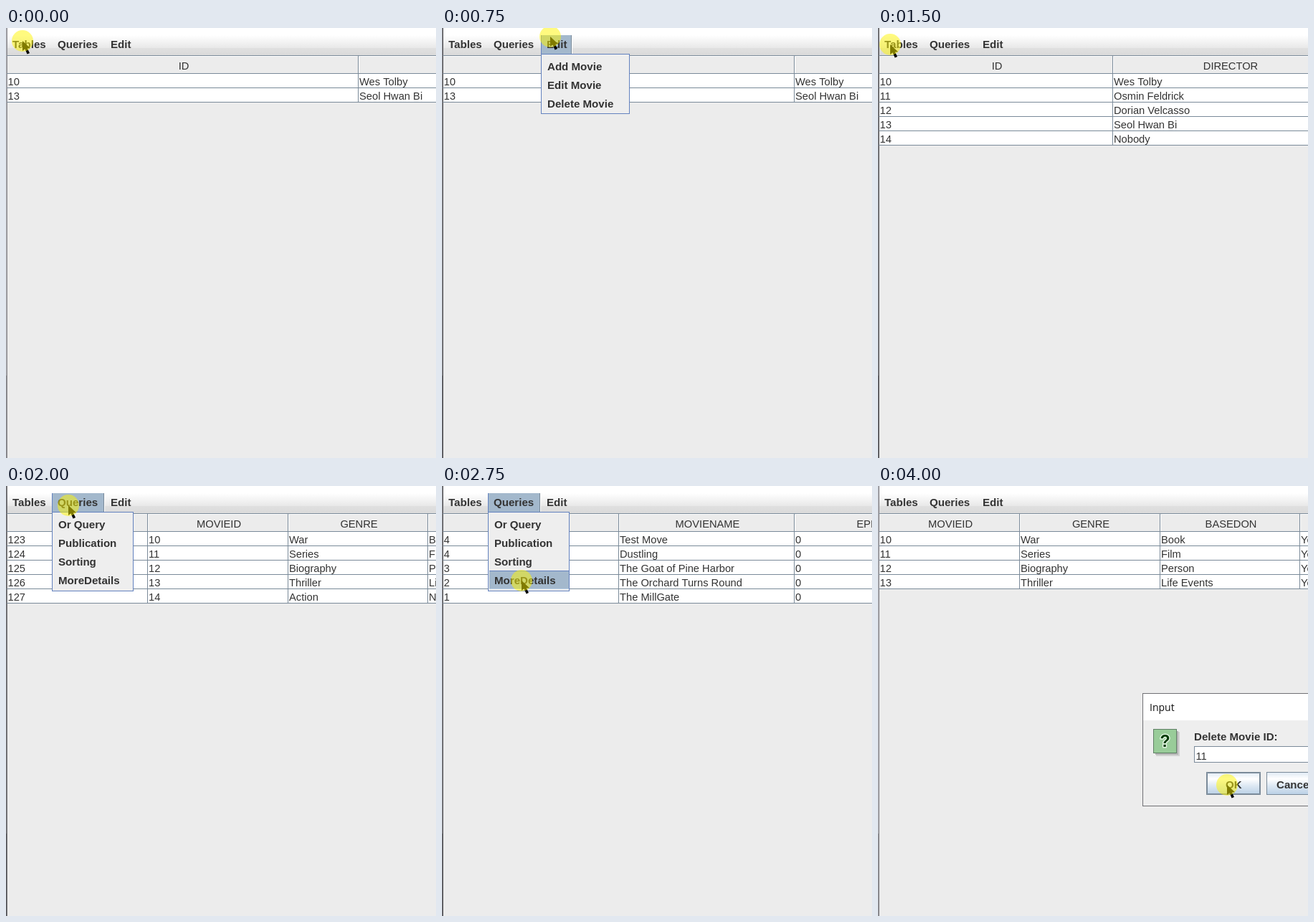
Write an HTML page with a canvas that moves like this. It is 600 px wide and 600 px high and loops after 4250 ms.

```html
<!DOCTYPE html>
<html lang="en">
<head>
<meta charset="utf-8">
<title>Movie tables</title>
<style>
html, body { margin: 0; width: 100%; height: 100%; overflow: hidden; background: #ececec; }
canvas { display: block; width: 600px; height: 600px; }
</style>
</head>
<body>
<canvas id="stage" width="600" height="600"></canvas>
<script>
const ctx = document.getElementById('stage').getContext('2d', { alpha: false });
const SANS = '"Liberation Sans", Arial, sans-serif';
const PLAIN = '14.7px ' + SANS;
const BOLD = 'bold 15.1px ' + SANS;
const LINE = '#7a8a99', BLUE = '#6382bf', PICK = '#a3b8cc', PANEL = '#ececec', INK = '#333';
const STEP = 250, LOOP = 4250;

// Column lines, headers and rows of each view
const found = {
  cols: [1, 491, 981], heads: ['ID', 'DIRECTOR'],
  rows: [['10', 'Wes Tolby'], ['13', 'Seol Hwan Bi']]
};
const directors = {
  cols: [1, 327, 653], heads: ['ID', 'DIRECTOR'],
  rows: [['10', 'Wes Tolby'], ['11', 'Osmin Feldrick'], ['12', 'Dorian Velcasso'],
    ['13', 'Seol Hwan Bi'], ['14', 'Nobody']]
};
const kinds = [['10', 'War', 'Book', 'Yes'], ['11', 'Series', 'Film', 'Yes'],
  ['12', 'Biography', 'Person', 'Yes'], ['13', 'Thriller', 'Life Events', 'Yes']];
const genres = {
  cols: [1, 197, 393, 588, 784], heads: ['ID', 'MOVIEID', 'GENRE', 'BASEDON'],
  rows: [...kinds, ['14', 'Action', 'Nothing']].map((r, i) => [String(123 + i), ...r.slice(0, 3)])
};
const sorted = {
  cols: [1, 246, 491, 737], heads: ['RATING', 'MOVIENAME', 'EPISODES'],
  rows: [['4', 'Test Move', '0'], ['4', 'Dustling', '0'], ['3', 'The Goat of Pine Harbor', '0'],
    ['2', 'The Orchard Turns Round', '0'], ['1', 'The MillGate', '0']]
};
const details = { cols: genres.cols, heads: ['MOVIEID', 'GENRE', 'BASEDON', 'AWARDED'], rows: kinds };

const menus = {
  Tables: { x: 1, end: 64, text: 9, w: 73, items: ['Movie', 'Crew', 'Genre', 'Cast', 'Date'] },
  Queries: { x: 64, end: 137, text: 72, w: 114, items: ['Or Query', 'Publication', 'Sorting', 'MoreDetails'] },
  Edit: { x: 138, end: 181, text: 146, w: 124, items: ['Add Movie', 'Edit Movie', 'Delete Movie'] }
};

// One entry per step: view, pointer, open menu, picked item
const steps = [
  { view: found, at: [23, 18] },
  { view: found, at: [103, 22] },
  { view: found, at: [110, 23], menu: 'Queries' },
  { view: found, at: [151, 12], menu: 'Edit' },
  { view: found, at: [150, 18], bare: true },
  { view: found, at: [40, 80], menu: 'Tables', pick: 1 },
  { view: directors, at: [17, 23] },
  { view: directors, at: [40, 106], menu: 'Tables', pick: 2 },
  { view: genres, at: [87, 27], menu: 'Queries' },
  { view: genres, at: [104, 113], menu: 'Queries', pick: 2 },
  { view: sorted, at: [100, 20] },
  { view: sorted, at: [111, 132], menu: 'Queries', pick: 3 },
  { view: details, at: [150, 18] },
  { view: details, at: [208, 103], menu: 'Edit', pick: 2 },
  { view: details, at: [481, 410], bare: true, entry: '' },
  { view: details, at: [487, 413], bare: true, entry: '' },
  { view: details, at: [487, 417], entry: '11' }
];

function box(x, y, w, h, color) {
  ctx.fillStyle = color;
  ctx.fillRect(x, y, w, h);
}

function frame(x, y, w, h, fill, edge) {
  box(x, y, w, h, edge);
  box(x + 1, y + 1, w - 2, h - 2, fill);
}

function write(text, x, y, font = PLAIN, align = 'left', color = INK) {
  ctx.font = font;
  ctx.textAlign = align;
  ctx.fillStyle = color;
  ctx.fillText(text, x, y);
}

function shade(y, h, ...stops) {
  const g = ctx.createLinearGradient(0, y, 0, y + h);
  stops.forEach(([p, c]) => g.addColorStop(p, c));
  return g;
}

function drawWindow(active) {
  box(0, 0, 600, 600, PANEL);
  box(0, 0, 600, 10, '#fff');
  box(0, 10, 600, 18, shade(10, 18, [0, '#fff'], [1, '#e8e8e8']));
  box(0, 28, 600, 10, shade(28, 10, [0, '#e0e0e0'], [1, '#dadada']));
  box(0, 0, 1, 600, active ? '#6c6c70' : '#aaaaae');
  box(0, 485, 1, 115, active ? '#505056' : '#85858a');
  box(1, 0, 1, 600, active ? '#77777b' : '#8c8c92');
}

function drawTable({ cols, heads, rows }) {
  const bottom = 64 + rows.length * 20;
  box(1, 38, 599, 1, LINE);
  box(2, 39, 598, 1, '#fff');
  box(2, 64, 598, bottom - 64, '#fff');
  box(1, 63, 599, 1, LINE);
  rows.forEach((row, r) => {
    box(1, 83 + r * 20, 599, 1, LINE);
    row.forEach((cell, c) => write(cell, cols[c] + (c ? 2 : 1.5), 80 + r * 20));
  });
  heads.forEach((head, c) => {
    write(head, (cols[c] + cols[c + 1]) / 2 + 2, 58, PLAIN, 'center');
    if (c) {
      box(cols[c], 39, 1, bottom - 39, LINE);
      box(cols[c] + 1, 39, 1, 24, '#fff');
    }
  });
}

function drawMenus(open, pick) {
  for (const name in menus) {
    const m = menus[name];
    if (name === open) {
      box(m.x, 10, m.end - m.x, 27, PICK);
      box(m.x, 10, 1, 27, BLUE);
      box(m.end - 1, 10, 1, 26, LINE);
      box(m.end, 11, 1, 25, '#fff');
    }
    write(name, m.text, 28, BOLD);
  }
  if (!open) return;
  const { x, w, items } = menus[open];
  const top = i => Math.round(39.5 + i * 26.3);
  frame(x, 36, w, Math.round(5 + items.length * 26.4), '#eee', BLUE);
  items.forEach((item, i) => {
    if (i === pick) {
      box(x + 2, top(i), w - 3, 26, PICK);
      box(x + 2, top(i), w - 3, 1, BLUE);
      box(x + 2, top(i) + 25, w - 3, 1, '#b8cfe5');
    }
    write(item, x + 9, top(i) + 18.5, BOLD);
  });
}

function drawButton(x, w, label, textX, main) {
  const face = shade(399, 32, [0, '#dde8f3'], [.3, '#fff'], [.6, '#dde8f3'], [1, '#b8cfe5']);
  frame(x, 399, w, 32, face, LINE);
  if (main) {
    ctx.strokeStyle = LINE;
    ctx.strokeRect(x + 1.5, 400.5, w - 3, 29);
  }
  write(label, textX, 422, BOLD);
}

function drawDialog(entry) {
  frame(369, 289, 240, 158, '#eee', '#707074');
  box(370, 290, 230, 37, '#fff');
  write('Input', 379, 314, '14px "Open Sans", "Noto Sans", sans-serif', 'left', '#111');

  box(388, 343, 33, 34, '#d2d2d2');
  box(387, 342, 32, 33, '#b4b4b4');
  frame(384, 339, 33, 34, '#99cc99', '#5f7f65');
  ctx.font = 'bold 23px ' + SANS;
  ctx.textAlign = 'center';
  ctx.lineJoin = 'round';
  ctx.lineWidth = 3;
  ctx.strokeStyle = '#e4f5e4';
  ctx.strokeText('?', 400.5, 364);
  ctx.lineWidth = 1;
  write('?', 400.5, 364, ctx.font, 'center', '#003a00');

  write('Delete Movie ID:', 441, 355, BOLD);
  frame(441, 363, 180, 23, '#fff', LINE);
  write(entry, 443.5, 382);
  drawButton(458, 76, 'OK', 485, true);
  drawButton(542, 90, 'Cancel', 556, false);
}

function drawPointer([x, y], bare) {
  const arrow = [[0, 0], [0, 14], [3.4, 11.2], [6.6, 18.5], [10, 17], [6.8, 10.4], [11, 10.2]];
  ctx.fillStyle = '#000';
  ctx.beginPath();
  arrow.forEach(([dx, dy]) => ctx.lineTo(x + dx, y + dy));
  ctx.fill();
  if (bare) return;
  ctx.fillStyle = 'rgba(255,246,0,.5)';
  ctx.beginPath();
  ctx.arc(x, y, 15, 0, Math.PI * 2);
  ctx.fill();
}

function draw(time) {
  const i = Math.floor((time % LOOP) / STEP);
  const { view, at, menu, pick, bare, entry } = steps[i];
  const asking = entry !== undefined;
  drawWindow(i > 0 && !asking);
  drawTable(view);
  drawMenus(menu, pick);
  if (asking) drawDialog(entry);
  drawPointer(at, bare);
}

const start = performance.now();
function tick(now) {
  draw(Math.max(0, now - start));
  requestAnimationFrame(tick);
}
draw(0);
requestAnimationFrame(tick);
</script>
</body>
</html>
```
